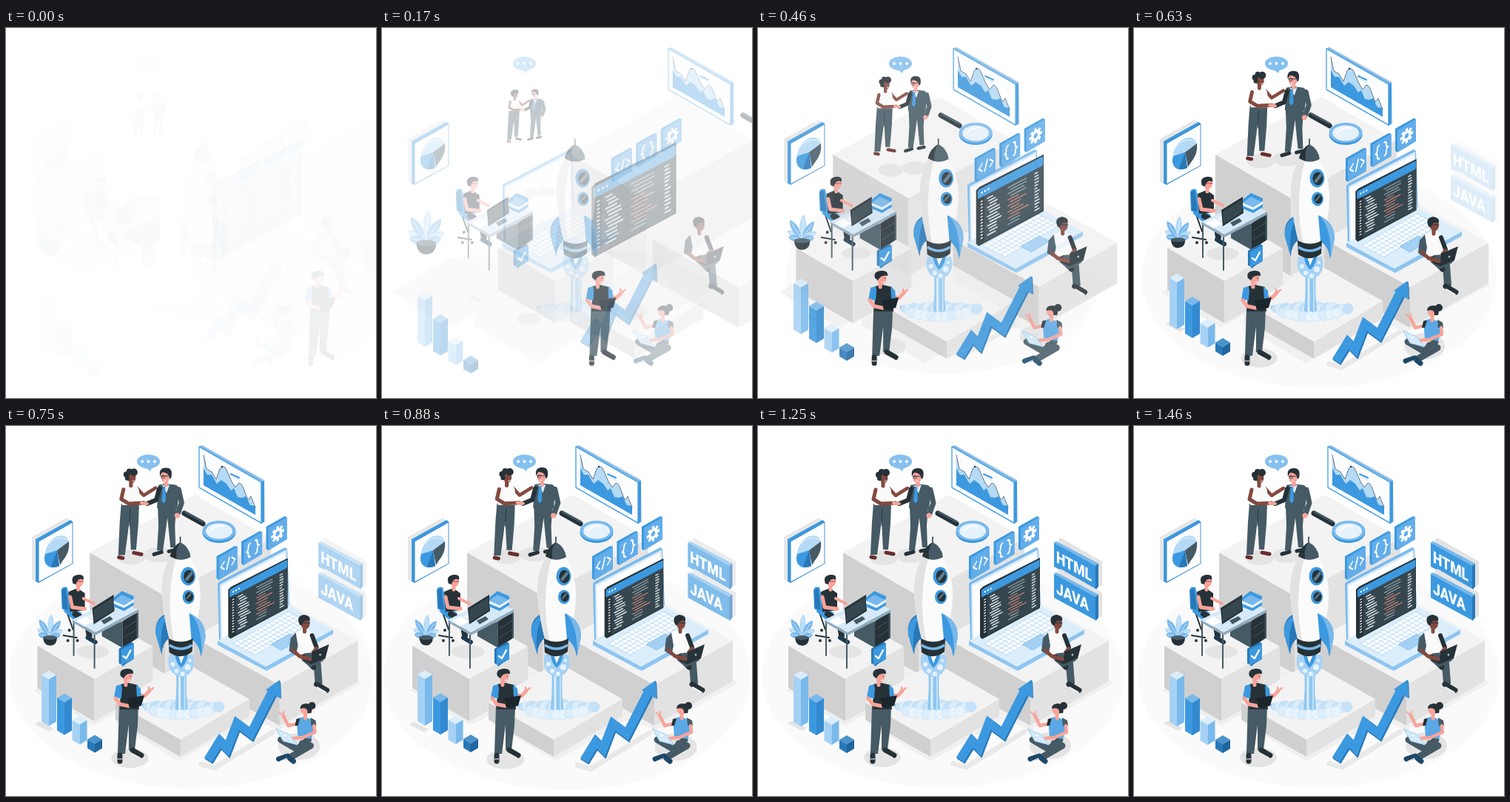
An HTML page for the animation above (1500 ms loop, 500 px wide and 500 px high).

```html
<!DOCTYPE html>
<html lang="en">
<head>
<meta charset="utf-8">
<title>Isometric startup scene</title>
<style>
html, body { margin: 0; width: 100%; height: 100%; overflow: hidden; background: #fff; }
svg { display: block; width: 100%; height: 100%; }
text { font-family: Roboto, Inter, sans-serif; font-weight: 900; font-size: 22px; fill: #fff; }
</style>
</head>
<body>
<svg id="stage" viewBox="0 0 500 500"></svg>
<script>
const BLUE = '#3c99df', MID = '#79b9ec', PALE = '#b5daf6', ICE = '#dceefb', NAVY = '#2878b8';
const DARK = '#263238', SLATE = '#455a64', SKIN = '#f7a49a', BROWN = '#84493f', WHITE = '#fff';

// drawing helpers
const poly = (pts, fill, more = '') => `<polygon points="${pts}" fill="${fill}" ${more}/>`;
const path = (d, fill, more = '') => `<path d="${d}" fill="${fill}" ${more}/>`;
const line = (d, color, w = 1, cap = 'round') =>
  `<path d="${d}" fill="none" stroke="${color}" stroke-width="${w}" stroke-linecap="${cap}" stroke-linejoin="${cap === 'butt' ? 'miter' : 'round'}"/>`;
const oval = (x, y, rx, ry, fill, more = '') =>
  `<ellipse cx="${x}" cy="${y}" rx="${rx}" ry="${ry}" fill="${fill}" ${more}/>`;
const dot = (x, y, r, fill, more) => oval(x, y, r, r, fill, more);
const rep = (n, f) => Array.from({ length: n }, (_, i) => f(i)).join('');

let seed = 7;
const rnd = () => (seed = seed * 16807 % 2147483647) / 2147483647;

// block from its left, front and right top corners
function block([lx, ly], [fx, fy], [rx, ry], h, c = ['#f3f3f3', '#d0d0d0', '#e2e2e2']) {
  return poly([lx, ly, lx + rx - fx, ly + ry - fy, rx, ry, fx, fy], c[0]) +
    poly([lx, ly, fx, fy, fx, fy + h, lx, ly + h], c[1]) +
    poly([fx, fy, rx, ry, rx, ry + h, fx, fy + h], c[2]);
}

const bar = (x, top, base, c) => block([x, top + 6], [x + 10, top + 12], [x + 20, top + 6], base - top - 12, c);

function bars() {
  const light = [ICE, '#a5d1f4', MID], deep = [MID, BLUE, '#3289cf'];
  return bar(48, 331, 406, light) + bar(69, 362, 418, deep) + bar(89.5, 392, 431, light) +
    bar(110, 418, 442, ['#4a93cc', NAVY, '#1f669f']);
}

const floor = () =>
  poly('37,357 118,405 150,387 148,402 233,453 333,396 368,411 481,347 390,300 118,310', '#f0f0f0');

function shade() {
  const c = '#e4e4e4';
  return [[170, 178, 19, 10], [207, 175, 20, 10], [168, 448, 25, 13], [395, 432, 28, 18], [118, 305, 22, 9]]
    .map(a => oval(...a, c)).join('') +
    line('M264 456L281 461L360 413', '#e9e9e9', 7) + poly('40,402 60,412 66,408 46,398', c);
}

function bubble() {
  return oval(192.5, 48, 15.5, 9.5, '#86c0ef') + poly('188,56 195,61 198,55', '#86c0ef') +
    rep(3, i => dot(184 + i * 8.5, 48, 1.9, WHITE));
}

function pie() {
  return poly('35,150 82,124 86,127 86,184 40,211 35,207', '#e6e6e6') +
    poly('40,153 87,127 90,129 90,186 44,212 40,210', BLUE) +
    poly('44,156 90,130 90,186 44,211', '#fcfdff', `stroke="${NAVY}" stroke-width=".8"`) +
    path('M69 168L53 176C52 160 65 148 74 148Q82 147 85 156Z', PALE) +
    path('M69 168L85 156Q87 170 76 183L73 188Z', SLATE) +
    path('M69 168L53 173C49 185 57 193 66 191L72 189Z', BLUE) +
    path('M69 168L61 190Q68 192 72 189Z', NAVY) +
    line('M54 164Q67 145 84 154', WHITE, .7);
}

function chart() {
  const ridge = 'L272 58L279 62L285 72L290 58Q295 51 299 59L306 75L311 83L316 77Q320 77 323 87L328 100L332 95L338 110';
  return poly('266,25 350,72 352,130 346,132 270,82', '#e3e3e3') +
    poly('262,28 265,26 350,74 350,129 346,132 262,84', MID) +
    poly('346,76 350,74 350,129 346,132', BLUE) +
    poly('262,28 346,76 346,131 262,83', '#fcfdff', `stroke="${BLUE}" stroke-width="1.2"`) +
    path('M268 39' + ridge + 'L338 120L268 80Z', PALE) +
    path('M268 57L273 66L279 66L286 78L292 73L299 78L305 87L309 84L314 96L320 97L325 95L331 107L338 108L338 120L268 80Z', BLUE) +
    line('M268 39' + ridge, SLATE, .8) +
    dot(293, 55, 1.2, DARK) + line('M305 65L316 70', BLUE, 2) + line('M308 69L316 73', PALE, 1);
}

function magnifier() {
  return line('M243 118L268 132', DARK, 7) + line('M244 116L268 129', SLATE, 3) +
    oval(290, 144, 22.5, 14, BLUE) + oval(290, 141.5, 22.5, 13.5, MID) +
    oval(290, 142, 18, 10.5, '#e6f2fb') + line('M278 142Q283 134 296 135', WHITE, 2);
}

function greeters() {
  const woman =
    path('M156 105H180L179 132L176 167H169L167 128L161 174H152L154 130Z', SLATE) +
    line('M168 112L167 135', DARK, .8) +
    line('M153 177L158 178', '#6b2e2e', 5) + line('M173 171L183 173', '#6b2e2e', 5) +
    line('M177 84L186 94L202 84', BROWN, 4.5) +
    path('M163 80L168 79L176 80Q181 84 180 94L180 107H157L160 94Z', '#fafafa') +
    line('M159 86L156 99L166 105L186 104', BROWN, 5) +
    line('M169 74V81', BROWN, 5) + oval(170, 70, 5.5, 7.5, BROWN) +
    [[163, 66, 4], [167, 62, 4], [173, 63, 5], [164, 71, 3]].map(a => dot(...a, DARK)).join('') +
    line('M171 75L174 74', WHITE, .8);
  const man =
    path('M205 108H230L228 135L229 164H222L218 124L212 168H204L206 135Z', SLATE) +
    line('M200 173L210 170M220 169L229 167', DARK, 5) +
    line('M233 86L237 104L232 118', SLATE, 7) + dot(231, 121, 3.5, SKIN) +
    path('M206 80L215 78L230 80Q236 85 233 96L231 112L204 111L205 94Z', SLATE) +
    path('M210 79L216 82L221 79L217 91Z', ICE) + poly('212,82 215,82 216,100 213,105 210,101', BLUE) +
    line('M207 85L203 100L191 105', DARK, 6) + line('M191 105L183 104', SKIN, 4) +
    line('M216 74V80', SKIN, 5) + oval(215, 69, 6, 8, SKIN) +
    path('M208 68Q206 57 216 57Q226 57 223 70L221 72Q220 63 211 63Z', DARK) +
    line('M209 68H219', DARK, .9) + dot(212, 69, 2, 'none', `stroke="${DARK}" stroke-width=".8"`) +
    line('M213 75L216 74', WHITE, .8);
  return woman + man;
}

function tile(i, sign) {
  const x = 313 + i * 33.5, y = 163 - i * 20;
  return poly([x - 28, y + 13, x - 3, y - 1, x, y, x, y + 30, x - 25, y + 45, x - 28, y + 43], BLUE) +
    poly([x - 25, y + 15, x, y, x, y + 30, x - 25, y + 45], '#62adea') +
    `<g transform="matrix(.866 -.5 0 1 ${x - 12.5} ${y + 22.5})">${sign}</g>`;
}

function tiles() {
  const code = line('M-6 -5L-11 0L-6 5M6 -5L11 0L6 5M2 -7L-2 7', WHITE, 2.1);
  const side = 'M-4 -9Q-7 -9 -7 -5Q-7 0 -10 0Q-7 0 -7 5Q-7 9 -4 9';
  const braces = line(side, WHITE, 2.2) + `<g transform="scale(-1 1)">${line(side, WHITE, 2.2)}</g>`;
  const gear = rep(8, i => `<rect x="-2" y="-10" width="4" height="5" fill="#fff" transform="rotate(${i * 45})"/>`) +
    dot(0, 0, 5.2, 'none', 'stroke="#fff" stroke-width="3.8"');
  return tile(0, code) + tile(1, braces) + tile(2, gear);
}

function laptop() {
  let s = poly('285,213 288,210 376,164 379,166 382,244 287,293', MID) +
    poly('288,214 378,167 381,244 289,290', '#d8ebfa') +
    poly('290,216 376,171 378,243 291,287', '#fdfdfe') +
    poly('285,290 350,325 441,275 441,281 351,331 285,296', '#8fc5f0') +
    poly('285,290 350,325 441,275 380,242', ICE) +
    poly('305,294 336,310 411,267 381,250', '#c1dff6');
  for (let r = 0; r < 5; r++) for (let c = 0; c < 14; c++)
    s += `<rect width="4.4" height="5" rx=".7" fill="#fff" transform="matrix(.98 -.565 .98 .5 ${307 + r * 6 + c * 5.3} ${293.8 + r * 3.1 - c * 3.05})"/>`;
  return s + poly('357,295 382,281 396,288 371,303', '#a4d0f4', `stroke="${MID}" stroke-width=".7"`);
}

// code window, drawn flat and then projected
function editor() {
  let s = `<rect width="80" height="66" rx="2" fill="#37474f"/><rect width="80" height="11" rx="2" fill="${BLUE}"/>` +
    `<rect y="11" width="8" height="55" fill="${DARK}"/>` + rep(3, i => dot(5 + i * 4, 5.5, 1.2, WHITE));
  for (let r = 0; r < 13; r++) {
    const y = 16 + r * 3.7, w = 6 + rnd() * 8;
    s += line(`M4 ${y}h1.5M${12 + r % 3 * 1.5} ${y}h${w}`, '#e2e9ed', 1.6);
    s += line(`M${37 + r % 2 * 3} ${y}h${9 + rnd() * 14}`, r > 3 && r < 11 ? '#c98479' : '#90a4ae', 1.3);
    s += line(`M70 ${y}h${2 + rnd() * 3}`, '#cfd8dc', 1.8);
  }
  return poly('300,221 304,217 381,178 381,246 303,288 300,285', DARK) +
    `<g transform="matrix(.98 -.51 0 .99 302 221)">${s}</g>`;
}

function sign(y, word) {
  return poly([407, y - 3, 410, y - 5, 466, y + 27, 466, y + 58, 463, y + 61, 407, y + 30], '#e3e3e3') +
    poly([401, y + 2, 404, y, 461, y + 30, 461, y + 61, 458, y + 65, 401, y + 34], BLUE) +
    poly([401, y + 2, 404, y, 461, y + 30, 457, y + 33], MID) +
    poly([457, y + 33, 461, y + 30, 461, y + 61, 457, y + 65], NAVY) +
    `<text transform="matrix(.8 .44 0 1 404 ${y + 28})">${word}</text>`;
}

function plant() {
  const leaf = (a, l, c) => `<g transform="translate(59 284) rotate(${a})">` +
    path(`M0 0Q-8 ${-l * .6} 0 ${-l}Q8 ${-l * .6} 0 0`, c) + line(`M0 0V${-l * .8}`, WHITE, .5) + '</g>';
  return [[-60, 20, PALE], [-32, 27, MID], [5, 30, PALE], [35, 26, MID], [65, 20, PALE], [-82, 16, MID], [85, 15, MID]]
    .map(a => leaf(...a)).join('') +
    path('M50 286Q51 297 60 297Q69 296 69 286Z', DARK) + oval(59.5, 286, 9.5, 3, SLATE);
}

function worker() {
  return line('M83 252L91 275M78 283L96 286', DARK, 2) + dot(86, 276, 2, DARK) + dot(97, 290, 2, DARK) + dot(84, 290, 2, DARK) +
    path('M75 222Q76 216 83 218L90 246L86 252L76 247Z', BLUE) + path('M76 222L81 219L85 250L77 246Z', NAVY) +
    path('M78 250L91 245L103 253L92 262Z', BLUE) +
    line('M94 254L110 264L113 283', DARK, 8) + line('M111 286L121 292', '#1c3a52', 6) +
    path('M85 224L97 219L107 226L107 249L87 251Z', DARK) +
    line('M87 231L90 245L107 247', SKIN, 5) + line('M105 233L119 240', SKIN, 4) +
    line('M98 214V221', SKIN, 5) + oval(99, 210, 6, 7.5, SKIN) +
    path('M91 213Q87 202 98 201Q107 200 105 208Q98 204 95 214Z', DARK) + line('M97 210H105', '#b53c3c', 1) +
    // furniture
    poly('130,275 158,264 158,300 130,284', SLATE) + poly('158,264 179,250 179,286 158,300', DARK) +
    line('M160 274L177 263M160 286L177 275', SLATE, 1) +
    line('M92 263V310M120 279V327M178 250V285', SLATE, 2) +
    poly('90,262 147,233 179,248 121,279', '#d5e9f8') +
    poly('90,262 121,279 179,248 179,252 121,283 90,265', '#8faabd') +
    poly('96,263 108,257 119,264 107,270', WHITE) + poly('111,257 117,254 127,259 121,263', '#f3f3f3') +
    poly('129,263 141,257 145,261 133,268', SLATE) + poly('117,246 146,228 147,250 119,268', DARK) +
    poly('119,248 145,232 145,249 120,265', '#37474f') +
    rep(3, i => poly([146, 244 - i * 4, 160, 250 - i * 4, 173, 242 - i * 4, 173, 238 - i * 4, 157, 231 - i * 4, 146, 240 - i * 4], i % 2 ? '#e9f4fc' : BLUE)) +
    poly('146,236 157,228 172,235 160,242', MID);
}

function check() {
  return poly('153,301 170,292 173,294 173,315 163,321 158,325 157,322 153,321', NAVY) +
    poly('156,302 173,294 173,315 156,323', BLUE) + line('M159 311L163 314L169 303', WHITE, 2.4);
}

function rocket() {
  const puffs = rep(15, i => {
    const x = 190 + i * 7, k = 1 - Math.abs(i - 7) / 8;
    return dot(x, 379 + k * 4, 4 + 8 * k + (i % 3), i % 2 ? ICE : '#c5e2f8', `stroke="${PALE}" stroke-width=".6"`);
  });
  const front = rep(9, i => dot(201 + i * 9, 384 + 6 * Math.sin((i + .5) / 9 * Math.PI), 7, i % 3 ? '#e8f4fd' : ICE, `stroke="${PALE}" stroke-width=".5"`));
  return dot(187, 378, 3, MID) + dot(291, 380, 3, MID) + puffs +
    path('M229 318H246Q242 355 247 390H228Q233 350 229 318Z', '#8fc7f1') + line('M235 325V387', ICE, 3) + line('M242 330V386', '#c1e1f8', 2) +
    front +
    path('M221 309H253Q258 325 248 335Q238 342 227 335Q217 326 221 309Z', '#a6d2f5') +
    [[226, 322, 3], [231, 331, 3], [246, 326, 4], [239, 335, 3], [249, 317, 2]].map(a => dot(...a, '#e6f3fd')).join('') +
    path('M229 309H246Q245 320 237 327Q230 320 229 309Z', BLUE) + path('M233 309H242L237 321Z', WHITE) +
    path('M223 252Q200 257 203 282L211 309Q211 293 222 286Z', NAVY) + path('M223 254Q208 263 210 306L203 281Q202 258 223 254Z', BLUE) +
    path('M223 175Q207 205 212 237Q215 266 222 291Q237 298 252 291Q262 260 263 232Q264 202 250 178Z', '#fbfbfb') +
    path('M223 175Q207 205 212 237Q215 266 222 291L228 293Q215 235 230 179Z', '#e2e2e2') +
    path('M248 253Q270 262 270 285L264 312Q262 295 251 288Z', BLUE) + path('M251 255Q265 269 265 309L270 285Q269 263 251 255Z', MID) +
    path('M220 287Q237 296 253 287L252 305Q237 317 221 306Z', DARK) + line('M221 296Q237 306 252 296', MID, 3.5, 'butt') +
    line('M236 150V162', DARK, 1.5) + path('M236 157Q248 163 250 177Q236 185 222 176Q225 163 236 157Z', SLATE) +
    path('M236 157Q225 163 222 176L231 180Q229 165 236 157Z', DARK) +
    oval(246.5, 203, 10, 12.5, BLUE) + oval(247.5, 203.5, 7, 9, DARK) + path('M242 207L251 196L253 200L245 210Z', '#607d8b') +
    oval(247, 231, 8, 9.5, BLUE) + oval(248, 231, 5.5, 6.5, DARK) + line('M245 233L250 227', '#607d8b', 2);
}

function arrow() {
  const d = 'M274 453L290 427L300 437L313 403L332 417L362 358';
  return line(d, NAVY, 13, 'butt') + `<g transform="translate(-1 -2)">${line(d, BLUE, 12, 'butt')}</g>` +
    poly('351,356 369,343 371,368', BLUE) + poly('369,343 371,345 372,367 371,368', NAVY);
}

function coder() {
  return line('M408 309L421 321L423 347', SLATE, 10) + line('M402 312L416 326', DARK, 7) +
    line('M420 349L434 357', DARK, 7) + line('M421 353L433 360', WHITE, 1.6) +
    path('M391 279L402 275L414 279L416 306L394 308Z', '#fafafa') +
    path('M392 279L385 287L383 304L392 310L395 297Z', SLATE) + line('M414 283L420 299', DARK, 6) +
    line('M388 303L397 311L411 315', BROWN, 5) + line('M420 300L415 306', BROWN, 4) +
    poly('414,305 437,295 432,314 413,323', DARK) + poly('398,315 413,322 432,314 428,318 412,326', SLATE) + dot(425, 309, 1.5, '#9fb3bd') +
    line('M404 271V278', BROWN, 5) + oval(405, 267, 6, 7.5, BROWN) +
    path('M397 268Q392 257 403 255Q413 256 411 264Q403 260 400 270Z', DARK) + line('M402 266H411', DARK, 1);
}

function sitter() {
  return dot(413, 378, 5, DARK) + line('M394 402L381 405L374 391', SKIN, 4.5) + line('M374 391L369 387M374 391L375 386', SKIN, 2) +
    line('M408 424L393 437L371 424', SLATE, 9) + line('M400 429L411 432L385 447', SLATE, 9) +
    line('M368 450L380 446M383 449L388 453', '#1e4767', 7) + line('M370 453L379 449', WHITE, 1) +
    path('M392 396L401 393L415 397L418 404L412 423L394 420Z', '#5ba8e5') + path('M392 396L397 395L394 405L390 405Z', DARK) +
    path('M411 394L418 398L419 405L412 405Z', SLATE) +
    line('M416 405L417 414L400 421L388 422', SKIN, 4.5) +
    poly('364,409 383,417 393,431 374,426', '#d4eafa', `stroke="${MID}" stroke-width=".6"`) + dot(377, 418, 1.4, WHITE) +
    line('M404 388V395', SKIN, 5) + oval(404, 383, 6.5, 7, SKIN) +
    path('M397 382Q397 375 406 375Q415 376 412 388L407 388Q408 379 397 382Z', DARK);
}

function presenter() {
  return path('M154 378H180L179 405L175 438H167L167 403L162 443H152L153 410Z', SLATE) +
    line('M155 445V453', DARK, 7) + line('M172 438L184 445', DARK, 7) + line('M152 450H158M172 443L182 448', WHITE, 1) +
    line('M182 363L188 365L195 358', SKIN, 5) + line('M195 358L200 354M194 357L194 353', SKIN, 2.5) +
    path('M156 349L166 347L179 350L181 383H155Z', DARK) +
    path('M157 349L150 351L147 367L157 368L158 355Z', BLUE) + path('M177 349L183 355L184 366L178 367Z', BLUE) +
    line('M149 368L155 376L170 379', SKIN, 5) + poly('165,368 188,364 184,378 168,382', '#1b262c') +
    line('M163 342V350', SKIN, 5) + oval(165, 338, 6.5, 8.5, SKIN) +
    path('M156 338Q153 329 164 328Q174 327 173 335Q164 333 160 341Z', DARK) + line('M166 344L169 343', WHITE, .9) +
    dot(169, 338, .7, DARK);
}

// motion tracks: values at these times, joined by a monotone cubic
const TIMES = [0, 170, 330, 630, 880, 1080, 1250, 1460];
function track(t, v) {
  const slope = i => (v[i + 1] - v[i]) / (TIMES[i + 1] - TIMES[i]);
  const tan = i => {
    if (i === 0) return slope(0);
    if (i >= v.length - 1) return 0;
    const a = slope(i - 1), b = slope(i);
    return a * b > 0 ? 2 * a * b / (a + b) : 0;
  };
  if (t >= TIMES[7]) return v[7];
  let i = 0;
  while (t >= TIMES[i + 1]) i++;
  const h = TIMES[i + 1] - TIMES[i], u = (t - TIMES[i]) / h, w = 1 - u;
  return w * w * (1 + 2 * u) * v[i] + u * u * (3 - 2 * u) * v[i + 1] + h * u * w * (w * tan(i) - u * tan(i + 1));
}
const rest = (...v) => v.concat(Array(8 - v.length).fill(0));
const EASE = rest(1, .82, .5, .03, -.035);
const DASH = rest(1, .49, .04, -.008);
const clamp = x => Math.max(0, Math.min(1, x));

const shift = (dx, dy = 0, v = EASE) => t => `translate(${dx * track(t, v)} ${dy * track(t, v)})`;
const zoom = (x, y, k) => t => {
  const s = 1 + k * track(t, EASE);
  return `translate(${x} ${y}) scale(${s}) translate(${-x} ${-y})`;
};
const still = () => '';
const fade = t => clamp(.02 + t / 550);
const quick = t => clamp(.08 + t / 260);
const late = t => clamp((t - 540) / 520);

const parts = [
  [oval(250, 338, 244, 151, '#fafafa'), zoom(250, 320, -.5)],
  [floor(), shift(-30)],
  [block([115, 171], [217, 230], [360, 152], 105), shift(1, 0, rest(290, 137, -18, -5))],
  [block([252, 286], [368, 350], [474, 290], 55), shift(1, 0, rest(230, 112, 21, 5))],
  [block([41, 297], [118, 342], [197, 298], 57), shift(1, 0, rest(235, 114, 20, 4))],
  [block([145, 374], [233, 424], [326, 369], 23), shift(1, 0, rest(215, 107, 37, 10, -1))],
  [shade(), zoom(250, 300, -.45)],
  [chart(), shift(250, 0, DASH)],
  [magnifier(), shift(490, 0, DASH)],
  [greeters(), zoom(194, 119, -.5)],
  [laptop(), shift(-245, 0, DASH)],
  [editor(), zoom(341, 235, .5)],
  [tiles(), shift(30)],
  [sign(156, 'HTML') + sign(198, 'JAVA'), shift(1, 0, [30, 30, 30, 27, 12, .5, -1, 0]), late],
  [plant(), zoom(59, 275, .5)],
  [worker(), shift(30)],
  [rocket(), shift(30)],
  [bars(), shift(0, 30)],
  [arrow(), shift(0, -30)],
  [coder(), shift(30)],
  [sitter(), shift(-30)],
  [check(), shift(30)],
  [bubble(), still],
  [pie(), still],
  [presenter(), shift(257, 0, DASH), quick]
];

const stage = document.getElementById('stage');
stage.innerHTML = parts.map(p => `<g>${p[0]}</g>`).join('');
const groups = [...stage.children];

const LOOP = 1500, STEP = LOOP / 36;
function draw(now) {
  const t = Math.floor((now % LOOP + 5) / STEP) % 36 * STEP;
  parts.forEach(([, move, alpha = fade], i) => {
    groups[i].setAttribute('transform', move(t));
    groups[i].setAttribute('opacity', alpha(t));
  });
}

let start;
function tick(now) {
  start ??= now;
  draw(now - start);
  requestAnimationFrame(tick);
}
draw(0);
requestAnimationFrame(tick);
</script>
</body>
</html>
```
